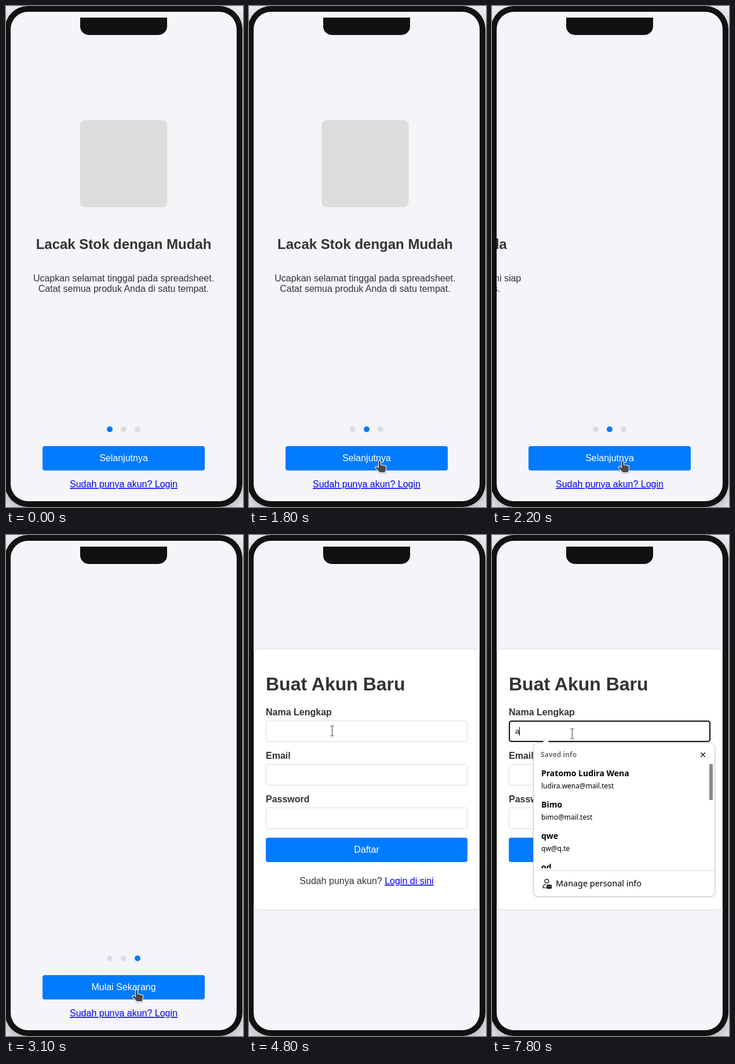
Write an HTML page that moves like this. It is 409x864 px and loops after 8000 ms.

```html
<!DOCTYPE html>
<html lang="id">
<head>
<meta charset="utf-8">
<title>Onboarding</title>
<style>
  html, body { margin: 0; width: 100%; height: 100%; overflow: hidden; background: #f0f2f5; }
  svg { display: block; }
  text { font: 16px "Liberation Sans", Arial, sans-serif; fill: #333; white-space: pre; }
  .mid { text-anchor: middle; }
  .bold { font-weight: bold; }
  .h1 { font-size: 32px; font-weight: bold; }
  .h2 { font-size: 24px; font-weight: bold; }
  .white { fill: #fff; }
  .link { fill: #00e; text-decoration: underline; }
  .typed { font-size: 13.333px; fill: #000; }
  .popup text { font-family: "Noto Sans", sans-serif; fill: #000; }
  .popup .head { font-size: 12px; font-weight: bold; fill: #757575; }
  .popup .name { font-size: 14px; font-weight: bold; }
  .popup .mail { font-size: 12px; }
  .popup .foot { font-size: 14.4px; }
  .cursor path { fill: #484848; stroke: #fff; stroke-width: 2; stroke-linejoin: round; paint-order: stroke; }
  .cursor .beam { fill: none; stroke-width: 3; stroke-opacity: .85; }
  .cursor .beam + .beam { stroke: #444; stroke-width: 1; stroke-opacity: 1; }
</style>
</head>
<body>
<svg id="stage" width="409" height="864" viewBox="0 0 409 864"></svg>
<script>
const LOOP = 8000, STEP = 100, SLIDE = 390, CENTER = 203;
const BLUE = '#007bff', GREY = '#ddd';

const rect = (x, y, w, h, r, fill, more = '') =>
  `<rect x="${x}" y="${y}" width="${w}" height="${h}" rx="${r}" fill="${fill}" ${more}/>`;
const text = (x, y, cls, s, id = '') =>
  `<text x="${x}" y="${y}" class="${cls}" ${id && `id="${id}"`}>${s}</text>`;
const group = (id, body, more = '') => `<g id="${id}" ${more}>${body}</g>`;

// Onboarding slides: the column is centred, so a third line lifts it.
const slides = [
  ['Lacak Stok dengan Mudah',
    'Ucapkan selamat tinggal pada spreadsheet.',
    'Catat semua produk Anda di satu tempat.'],
  ['Pindai &amp; Cari Cepat',
    'Gunakan kamera ponsel Anda untuk memindai',
    'barcode dan menemukan produk dalam hitungan',
    'detik.'],
  ['Kembangkan Bisnis Anda',
    'Dari usaha kecil hingga gudang besar, kami siap',
    'membantu Anda mengelola inventaris.']
];

function slide([title, ...lines], i) {
  const x = CENTER + i * SLIDE, y = 197 - (lines.length - 2) * 9;
  return rect(x - 75, y, 150, 150, 8, GREY) +
    text(x, y + 222, 'mid h2', title) +
    lines.map((s, n) => text(x, y + 278 + n * 18, 'mid', s)).join('');
}

const intro = group('intro',
  group('track', slides.map(slide).join('')) +
  [179, 203, 227].map(x => `<circle class="dot" cx="${x}" cy="730" r="5"/>`).join('') +
  rect(63, 759, 280, 42, 4, BLUE) +
  text(CENTER, 785, 'mid white', '', 'next') +
  text(CENTER, 830, 'mid link', 'Sudah punya akun? Login'));

const field = (label, y) => text(29, y, 'bold', label) +
  rect(29.5, y + 9.5, 347, 36, 3.5, '#fff', `stroke="${GREY}"`);

const form = group('form',
  rect(8.5, 196.5, 389, 450, 7.5, '#fff', `stroke="${GREY}"`) +
  text(29, 268, 'h1', 'Buat Akun Baru') +
  field('Nama Lengkap', 311) + field('Email', 386) + field('Password', 461) +
  rect(29, 522, 348, 42, 4, BLUE) +
  text(CENTER, 548, 'mid white', 'Daftar') +
  text(CENTER, 602, 'mid', 'Sudah punya akun? <tspan class="link">Login di sini</tspan>'));

const people = [
  ['Pratomo Ludira Wena', 'ludira.wena@mail.test'],
  ['Bimo', 'bimo@mail.test'],
  ['qwe', 'qw@q.te'],
  ['od', '']
];

const popup = group('popup',
  rect(30, 321, 346, 35, 3.5, 'none', 'stroke="#101010" stroke-width="2"') +
  rect(71.5, 358.5, 313, 265, 8, '#fff', 'stroke="#ccc" filter="url(#soft)"') +
  '<path d="M86 359.2L93 351.5 100 359.2" fill="#fff" stroke="#ccc"/>' +
  '<path d="M86.5 359.5H99.5" stroke="#fff"/>' +
  text(84, 383, 'head', 'Saved info') +
  '<path d="M360.2 375.2l7.6 7.6m0-7.6l-7.6 7.6" stroke="#111" stroke-width="1.3"/>' +
  group('list', people.map(([name, mail], i) =>
    text(85, 416 + i * 54, 'name', name) + text(85, 437 + i * 54, 'mail', mail)).join(''),
    'clip-path="url(#listClip)"') +
  rect(375, 395, 6, 67, 0, '#8b8b8b', 'id="thumb"') +
  rect(72, 578, 312, 1, 0, '#dcdcdc') +
  '<g fill="none" stroke="#111" stroke-width="1.3"><circle cx="94.5" cy="597" r="3.4"/>' +
  '<path d="M93 608.3H88.2V606.5Q88.2 603.4 92.5 602.6"/></g>' +
  rect(94, 603, 9, 7, 1.5, '#111') +
  '<path d="M96 606.5h1.6m1.4 0h2.2" stroke="#fff"/>' +
  text(110, 606, 'foot', 'Manage personal info'),
  'class="popup"');

const beam = 'M-3-8.5H-1Q0-8.5 0-7.5V7.5Q0 8.5-1 8.5H-3M3-8.5H1Q0-8.5 0-7.5M0 7.5Q0 8.5 1 8.5H3';
const cursor = group('cursor',
  group('arrow', '<path d="M0 .5V17L3.9 13.6 6.1 18.6 8.6 17.5 6.6 12.6H11.6Z"/>') +
  group('hand', '<path d="M-1.2 2Q-1.2 .6 .4 .6T2 2V7.6L9.8 9.4Q11.6 10 11.4 12L9.8 20.2H1L-6.6 12.4Q-6.2 9.8-3.6 11L-1.2 13Z"/>') +
  group('beam', `<path class="beam" d="${beam}"/><path class="beam" d="${beam}"/>`,
    'transform="translate(.5 .5)"'),
  'class="cursor" filter="url(#drop)"');

const stage = document.getElementById('stage');
stage.innerHTML = `<defs>
    <clipPath id="screen">${rect(8, 10, 390, 844, 30, '#000')}</clipPath>
    <clipPath id="listClip">${rect(72, 395, 303, 180, 0, '#000')}</clipPath>
    <filter id="shade" x="-20%" y="-20%" width="140%" height="140%"><feGaussianBlur stdDeviation="15"/></filter>
    <filter id="soft"><feDropShadow dx="0" dy="1" stdDeviation="1.5" flood-opacity=".15"/></filter>
    <filter id="drop" x="-50%" y="-50%" width="200%" height="200%">
      <feDropShadow dx="0" dy="1" stdDeviation="1" flood-opacity=".3"/></filter>
  </defs>` +
  rect(0, 0, 409, 864, 0, '#f0f2f5') +
  rect(-2, 10, 410, 864, 40, '#000', 'opacity=".3" filter="url(#shade)"') +
  rect(-2, 0, 410, 864, 40, '#111') +
  `<g clip-path="url(#screen)">${rect(8, 10, 390, 844, 0, '#f4f4f9')}${intro}${form}</g>` +
  '<path d="M128 20H278V35A15 15 0 0 1 263 50H143A15 15 0 0 1 128 35Z" fill="#111"/>' +
  popup + text(40, 343, 'typed', 'a', 'typed') +
  rect(40, 331, 1, 15, 0, '#000', 'id="caret"') + cursor;

const $ = id => document.getElementById(id);
const dots = [...stage.querySelectorAll('.dot')];
const show = (id, on) => $(id).setAttribute('display', on ? 'inline' : 'none');
const clamp = v => Math.min(1, Math.max(0, v));

// cubic-bezier(.42, 0, .58, 1)
function easeInOut(p) {
  let lo = 0, hi = 1;
  for (let i = 0; i < 24; i++) {
    const s = (lo + hi) / 2, q = 1 - s;
    if (1.26 * s * q * q + 1.74 * s * s * q + s ** 3 < p) lo = s; else hi = s;
  }
  return lo * lo * (3 - 2 * lo);
}

// start, end, from, to
const moves = [
  [500, 900, [319, 667], [229, 793]],
  [1000, 1200, [229, 793], [225, 784]],
  [4400, 4800, [225, 785], [143, 337]],
  [5900, 6100, [143, 337], [138, 342]]
];

function pointer(t) {
  const [a, b, from, to] = moves.filter(m => t >= m[0]).pop() || moves[0];
  const p = clamp((t - a) / (b - a));
  return from.map((v, i) => Math.round(v + (to[i] - v) * p));
}

function pointerKind(t, y) {
  const inside = (top, bottom) => y >= top && y < bottom;
  if (t < 4100) return inside(759, 801) ? 'hand' : 'arrow';
  if (inside(522, 564)) return 'hand';
  return [320, 395, 470].some(top => inside(top, top + 37)) ? 'beam' : 'arrow';
}

function draw(t) {
  const onForm = t >= 4000, focused = t >= 4900, typed = t >= 7800;
  const page = t < 1800 ? 0 : t < 3100 ? 1 : 2;

  show('intro', !onForm);
  show('form', onForm);
  // The track shifts by its own full width, three slides at once.
  const shift = -3 * SLIDE * easeInOut(clamp((t - 1783) / 500));
  $('track').setAttribute('transform', `translate(${shift.toFixed(2)} 0)`);
  dots.forEach((d, i) => d.setAttribute('fill', i === page ? BLUE : GREY));
  $('next').textContent = page < 2 ? 'Selanjutnya' : 'Mulai Sekarang';

  show('popup', focused);
  show('typed', typed);
  show('caret', focused && (t < 5900 || t >= 6900));
  $('caret').setAttribute('x', typed ? 47 : 40);
  $('thumb').setAttribute('height', typed ? 62 : 67);

  const [x, y] = pointer(t), kind = pointerKind(t, y);
  show('cursor', t >= 500);
  $('cursor').setAttribute('transform', `translate(${x} ${y})`);
  for (const k of ['arrow', 'hand', 'beam']) show(k, k === kind);
}

function frame() {
  const t = performance.now() % LOOP;
  draw(Math.floor(t / STEP) * STEP);
  requestAnimationFrame(frame);
}
frame();
</script>
</body>
</html>
```
